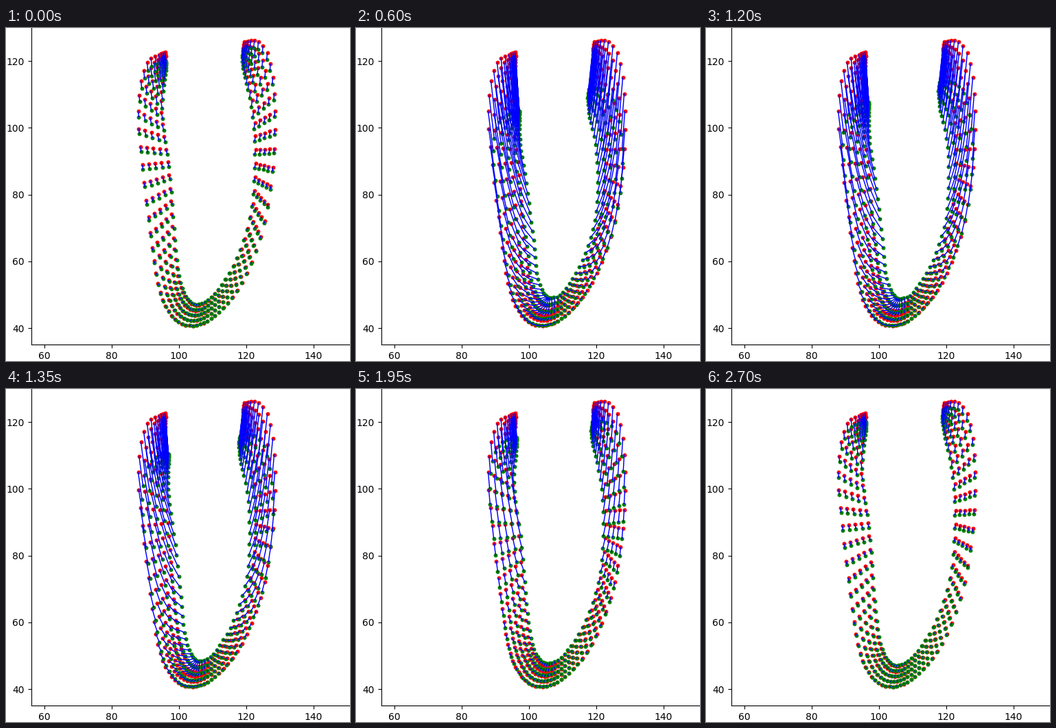
These frames come from a looping animation (501 px wide and 485 px high, 2.85 s). A matplotlib script:

```python
import numpy as np
import matplotlib.pyplot as plt
from matplotlib.animation import FuncAnimation
from matplotlib.collections import LineCollection

WIDTH, HEIGHT, DPI = 501, 485, 100
LEFT, BOTTOM, AX_W, AX_H = 36.5, 23.5, 465, 462
XLIM, YLIM = (56, 151), (35, 130)
FRAMES, INTERVAL = 19, 150
N_ROWS, N_LAYERS = 67, 5

# Wall contours run from the left tip round the apex to the right tip,
# as stage pixels at these row numbers.
KNOTS = np.array([0, 3, 6, 8, 10, 13, 16, 19, 22, 25, 28, 31, 34,
                  37, 40, 43, 46, 49, 52, 55, 57, 59, 61, 63, 66])
OUTER = [(231, 35), (222, 38.5), (205, 50), (196, 77), (192, 121),
         (198, 199), (207, 275), (215, 339), (224, 385), (236, 412),
         (250, 427.5), (266.5, 433), (282, 431), (298, 423), (316, 407),
         (336, 382), (357, 341), (376, 281), (388, 203), (391, 121),
         (388, 72), (380, 36), (367, 20), (356, 18), (346, 20)]
INNER = [(232, 41), (231, 55), (227, 80), (225, 106), (227, 140),
         (235, 195), (239.5, 252), (243, 306), (248, 349), (254, 378),
         (263, 395), (273, 403), (285, 402), (299, 392), (314, 374),
         (331, 346), (347, 307), (359, 256), (363, 197), (362, 138),
         (358, 105), (353, 80), (349, 62), (346, 49), (344, 33)]

# Displacement at peak contraction, at the same rows.
OUTER_SHIFT = [(8, 104), (9, 102), (11, 97), (10, 84), (9, 70),
               (9, 55), (8, 40), (8, 25), (8, 14), (9, 8),
               (8, 3), (5, 0), (3, -1), (0, 0), (-2, 2),
               (-4, 5), (-6, 11), (-6, 25), (-5, 45), (-5, 66),
               (-7, 78), (-8, 83), (-9, 85), (-9, 85), (-9, 84)]
INNER_SHIFT = [(7, 103), (8, 104), (14, 100), (18, 88), (20, 72),
               (18, 55), (19, 37), (21, 19), (18, 9), (20, 3),
               (18, -5), (9, -13), (-1, -12), (-3, -4), (-5, -3),
               (-8, 2), (-12, 11), (-14, 29), (-15, 51), (-14, 70),
               (-12, 79), (-12, 81), (-12, 83), (-10, 83), (-9, 83)]

# Contraction over time: (frame, radial amount, longitudinal amount).
BEAT = np.array([(0, .11, .12), (2, .42, .44), (4, .80, .82), (6, 1, 1),
                 (8, .70, .70), (11, .49, .36), (13, .23, .33),
                 (16, .17, .24), (18, .10, .11)])


def smooth(knots, values, at):
    """Cubic Hermite curve through the values at the knots."""
    values = np.asarray(values, float)
    slopes = np.gradient(values, knots, axis=0)
    i = np.clip(np.searchsorted(knots, at, side="right") - 1, 0, len(knots) - 2)
    step = (knots[i + 1] - knots[i])[:, None]
    t = (at - knots[i])[:, None] / step
    return ((1 + 2 * t) * (1 - t) ** 2 * values[i]
            + t * (1 - t) ** 2 * step * slopes[i]
            + t ** 2 * (3 - 2 * t) * values[i + 1]
            + t ** 2 * (t - 1) * step * slopes[i + 1])


def wall(outer, inner):
    """Fill the wall with evenly spaced layers between two contours."""
    rows = np.arange(N_ROWS)
    a, b = smooth(KNOTS, outer, rows), smooth(KNOTS, inner, rows)
    depth = np.linspace(0, 1, N_LAYERS)[:, None, None]
    return (a + (b - a) * depth).reshape(-1, 2)


def to_data(pixels):
    x = XLIM[0] + (pixels[:, 0] + 0.5 - LEFT) * (XLIM[1] - XLIM[0]) / AX_W
    y = YLIM[0] + (HEIGHT - pixels[:, 1] - 0.5 - BOTTOM) * (YLIM[1] - YLIM[0]) / AX_H
    return np.column_stack([x, y])


rest = wall(OUTER, INNER)
shift = wall(OUTER_SHIFT, INNER_SHIFT)
amounts = smooth(BEAT[:, 0], BEAT[:, 1:], np.arange(FRAMES))
start = to_data(rest)

# The small excess keeps the pixel size from rounding down.
fig = plt.figure(figsize=((WIDTH + 0.01) / DPI, (HEIGHT + 0.01) / DPI), dpi=DPI)
ax = fig.add_axes([LEFT / WIDTH, BOTTOM / HEIGHT, AX_W / WIDTH, AX_H / HEIGHT])
ax.set(xlim=XLIM, ylim=YLIM, xticks=range(60, 141, 20), yticks=range(40, 121, 20))

dot = dict(s=18, linewidths=0)
ax.scatter(*start.T, color="red", zorder=1, **dot)
moving = ax.scatter(*start.T, color="green", zorder=1.5, **dot)
paths = LineCollection([], colors="blue", linewidths=1.05, capstyle="round", zorder=2)
ax.add_collection(paths, autolim=False)


def update(frame):
    end = to_data(rest + shift * amounts[frame])
    moving.set_offsets(end)
    paths.set_segments(np.stack([start, end], axis=1))
    return moving, paths


anim = FuncAnimation(fig, update, frames=FRAMES, interval=INTERVAL,
                     repeat=True, repeat_delay=0)
plt.show()
```
